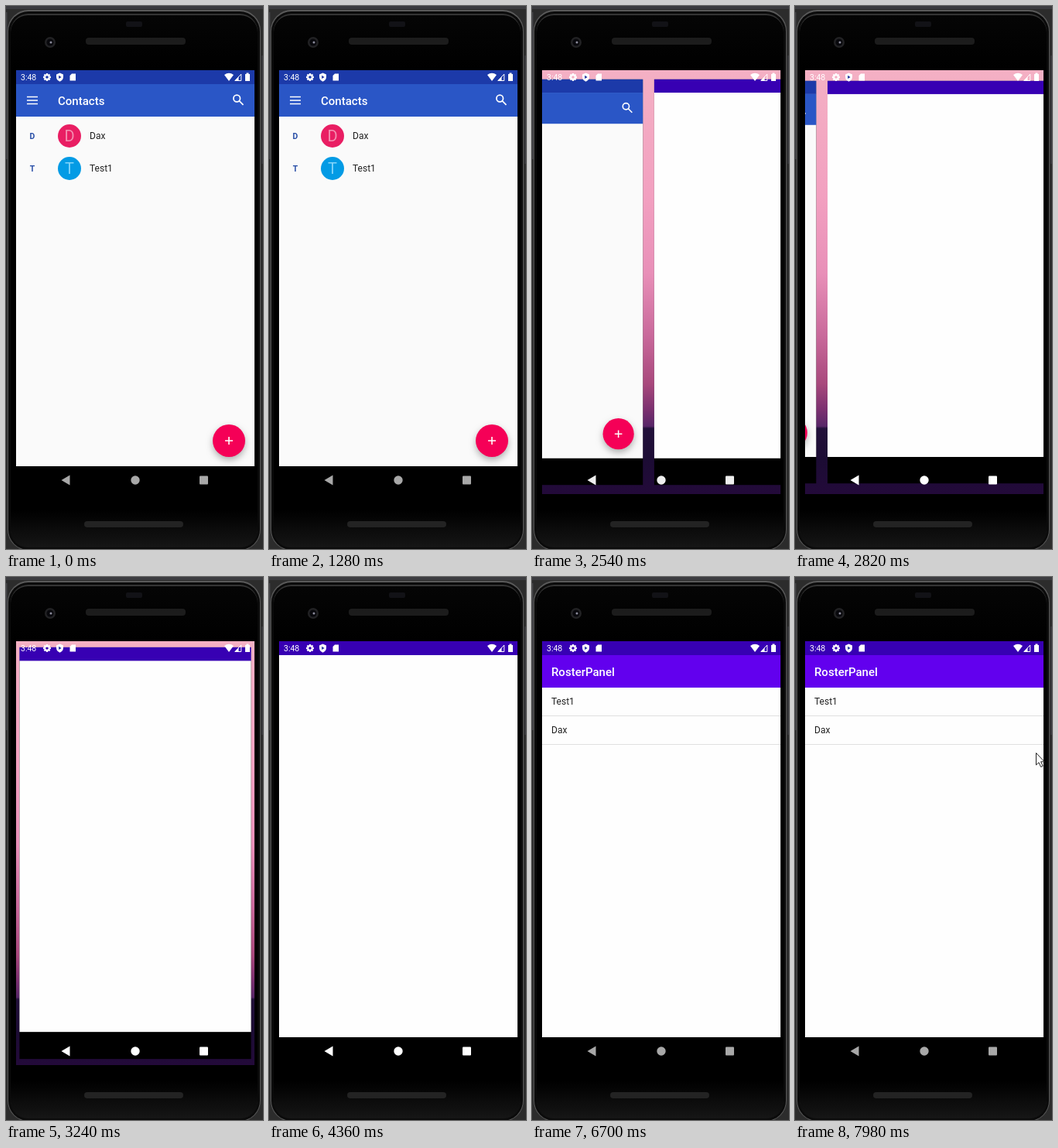
An HTML page with a canvas that plays this animation: 332 by 702 pixels, repeating every 8000 ms.

```html
<!DOCTYPE html>
<html lang="en">
<head>
<meta charset="utf-8">
<title>Switching apps</title>
<style>
  html, body { margin: 0; width: 100%; height: 100%; overflow: hidden; background: #2c2c2c; }
  canvas { display: block; }
</style>
</head>
<body>
<canvas id="stage" width="332" height="702"></canvas>
<script>
const ctx = document.getElementById('stage').getContext('2d');
const LOOP = 8000;
const SCREEN = { x: 13, y: 83, w: 308, h: 548, cx: 167, cy: 357 };
const CARD_GAP = 14.7;

const clamp = v => Math.max(0, Math.min(1, v));
const ramp = (t, start, length) => clamp((t - start) / length);
const ease = p => (1 - Math.cos(Math.PI * p)) / 2;

function rect(x, y, w, h, color) {
  ctx.fillStyle = color;
  ctx.fillRect(x, y, w, h);
}

function pill(x, y, w, h, r, color) {
  ctx.beginPath();
  ctx.roundRect(x, y, w, h, r);
  ctx.fillStyle = color;
  ctx.fill();
}

function disc(x, y, r, color) {
  ctx.beginPath();
  ctx.arc(x, y, r, 0, 2 * Math.PI);
  ctx.fillStyle = color;
  ctx.fill();
}

function shape(path, color) {
  ctx.fillStyle = color;
  ctx.fill(new Path2D(path));
}

function line(path, color, width) {
  ctx.strokeStyle = color;
  ctx.lineWidth = width;
  ctx.stroke(new Path2D(path));
}

function label(text, x, y, size, color, weight = 400, align = 'left') {
  ctx.font = `${weight} ${size}px Roboto, sans-serif`;
  ctx.textAlign = align;
  ctx.fillStyle = color;
  ctx.fillText(text, x, y);
}

function gradient(x0, y0, x1, y1, stops) {
  const g = ctx.createLinearGradient(x0, y0, x1, y1);
  stops.forEach(([at, color]) => g.addColorStop(at, color));
  return g;
}

function drawPhone() {
  rect(0, 0, 332, 702, '#2c2c2c');
  rect(0, 0, 332, 4, '#3c3c40');
  rect(0, 8, 1.5, 190, '#444448');
  rect(330, 64, 2, 140, '#39393c');
  pill(2, 5, 327, 699, 27, '#5a5a5a');
  pill(3, 7, 325, 696, 26, '#0b0b0b');
  pill(6, 10, 319, 689, 23, '#343434');
  pill(6, 12, 319, 688, 22, gradient(0, 12, 0, 700, [
    [0, '#050505'], [0.1, '#000'], [0.93, '#000'], [1, '#161616']]));
  pill(155, 20, 21, 7, 2, '#121216');
  pill(103, 41, 129, 9, 4, '#1c1c1c');
  pill(101, 666, 128, 8, 4, '#232323');
  disc(57, 47, 7, '#222224');
  disc(57, 47, 4.5, '#08080c');
  disc(58, 47, 1.5, '#8c8c9c');
}

function drawWallpaper() {
  const { x, y, w, h } = SCREEN;
  rect(x, y, w, h, gradient(0, y, 0, y + h, [
    [0, '#f4b0c4'], [0.3, '#f2a0c0'], [0.48, '#e88fb8'], [0.63, '#c8689a'],
    [0.74, '#a8487c'], [0.8, '#7c3070'], [0.84, '#582668'],
    [0.845, '#22103a'], [0.92, '#1c0c34'], [1, '#230a3a']]));
}

function drawContacts() {
  rect(13, 83, 308, 512, '#fafafa');
  rect(13, 83, 308, 18, '#1c3aa9');
  rect(13, 101, 308, 42, '#2a56c6');
  line('M27 117.5h14M27 122h14M27 126.5h14', '#fff', 1.5);
  label('Contacts', 67, 128, 15, '#fff', 500);
  line('M302.5 119.5a4.3 4.3 0 1 1-8.6 0a4.3 4.3 0 1 1 8.6 0M301.3 122.7l5.2 5.2', '#fff', 1.7);

  [['D', 'Dax', 168, '#e91e63', '#f48fb1'],
   ['T', 'Test1', 210, '#039be5', '#81d4fa']].forEach(([initial, name, y, color, tint]) => {
    label(initial, 34, y + 4, 10.5, '#2a50a8', 700, 'center');
    disc(82, y, 15, color);
    label(initial, 82, y + 7, 20, tint, 400, 'center');
    label(name, 108, y + 4, 12, '#212121');
  });

  ctx.save();
  ctx.shadowColor = 'rgba(0, 0, 0, .3)';
  ctx.shadowBlur = 9;
  ctx.shadowOffsetY = 4;
  disc(288, 562, 21, '#f50057');
  ctx.restore();
  line('M283 562h10M288 557v10', '#fff', 1.6);
}

function drawRoster(loaded) {
  rect(13, 83, 308, 512, '#fefefe');
  rect(13, 83, 308, 18, '#3700b3');
  if (!loaded) return;
  rect(13, 101, 308, 42, '#6200ee');
  label('RosterPanel', 25, 128, 15, '#fff', 500);
  ['Test1', 'Dax'].forEach((name, i) => {
    label(name, 25, 165 + 37 * i, 12, '#212121');
    rect(13, 179 + 37 * i, 308, 1, '#e0e0e0');
  });
}

// Draws an app with its navigation area, scaled about the screen centre.
function drawCard(shift, scale, content) {
  const { x, y, w, h, cx, cy } = SCREEN;
  ctx.save();
  ctx.translate(cx + shift, cy);
  ctx.scale(scale, scale);
  ctx.translate(-cx, -cy);
  rect(x, y, w, h, '#000');
  content();
  ctx.restore();
}

function drawGear(x, y) {
  ctx.save();
  ctx.translate(x, y);
  for (let i = 0; i < 8; i++) {
    rect(-1.1, -5, 2.2, 2, '#fff');
    ctx.rotate(Math.PI / 4);
  }
  ctx.restore();
  ctx.beginPath();
  ctx.arc(x, y, 2.8, 0, 2 * Math.PI);
  ctx.lineWidth = 2;
  ctx.strokeStyle = '#fff';
  ctx.stroke();
}

function drawStatus() {
  label('3:48', 19, 96, 10.5, '#fff');
  drawGear(53, 92);
  shape('M69.5 86.5l4.5 2v3.3q0 4-4.5 5.9q-4.5-1.9-4.5-5.9v-3.3z', '#fff');
  shape('M68.2 89.7l3.4 2.2l-3.4 2.2z', '#1c2f9c');
  shape('M85 87.5h5v9h-7.5v-6.5z', '#fff');
  shape('M282 89q6-4.5 12 0l-6 8z', '#fff');
  line('M295.8 96.5h8v-8.5z', '#fff', 1);
  shape('M295.5 96.8h5v-5z', '#fff');
  shape('M309 88h1.5v-1.5h3v1.5h1.5v9h-6z', '#fff');
}

function drawNavigation(brightness) {
  const level = Math.round(168 + 87 * brightness);
  const color = `rgb(${level}, ${level}, ${level})`;
  shape('M71.5 613l11-6.5v13z', color);
  disc(167, 613, 5.7, color);
  pill(250, 607.5, 11, 11, 1, color);
}

function drawCursor() {
  const arrow = 'M311.5 227.5v15.5l3.5-3.2l2.6 5.7l2.6-1.2l-2.6-5.5h4.6z';
  shape(arrow, '#fff');
  line(arrow, '#222', 1);
}

function draw(t) {
  const slide = ease(ramp(t, 2037, 944));
  const shrink = ease(ramp(t, 2000, 720)) * (1 - ease(ramp(t, 3050, 420)));
  const scale = 1 - 0.0504 * shrink;
  const spacing = SCREEN.w * scale + CARD_GAP;
  const brightness = ramp(t, 2300, 300) * (1 - ramp(t, 5000, 1700));

  drawPhone();
  ctx.save();
  ctx.beginPath();
  ctx.rect(SCREEN.x, SCREEN.y, SCREEN.w, SCREEN.h);
  ctx.clip();
  drawWallpaper();
  drawCard(-slide * spacing, scale, drawContacts);
  drawCard((1 - slide) * spacing, scale, () => drawRoster(t >= 4900));
  drawStatus();
  drawNavigation(brightness);
  ctx.restore();
  if (t >= 7940) drawCursor();
}

function tick() {
  draw(performance.now() % LOOP);
  requestAnimationFrame(tick);
}
tick();
</script>
</body>
</html>
```
